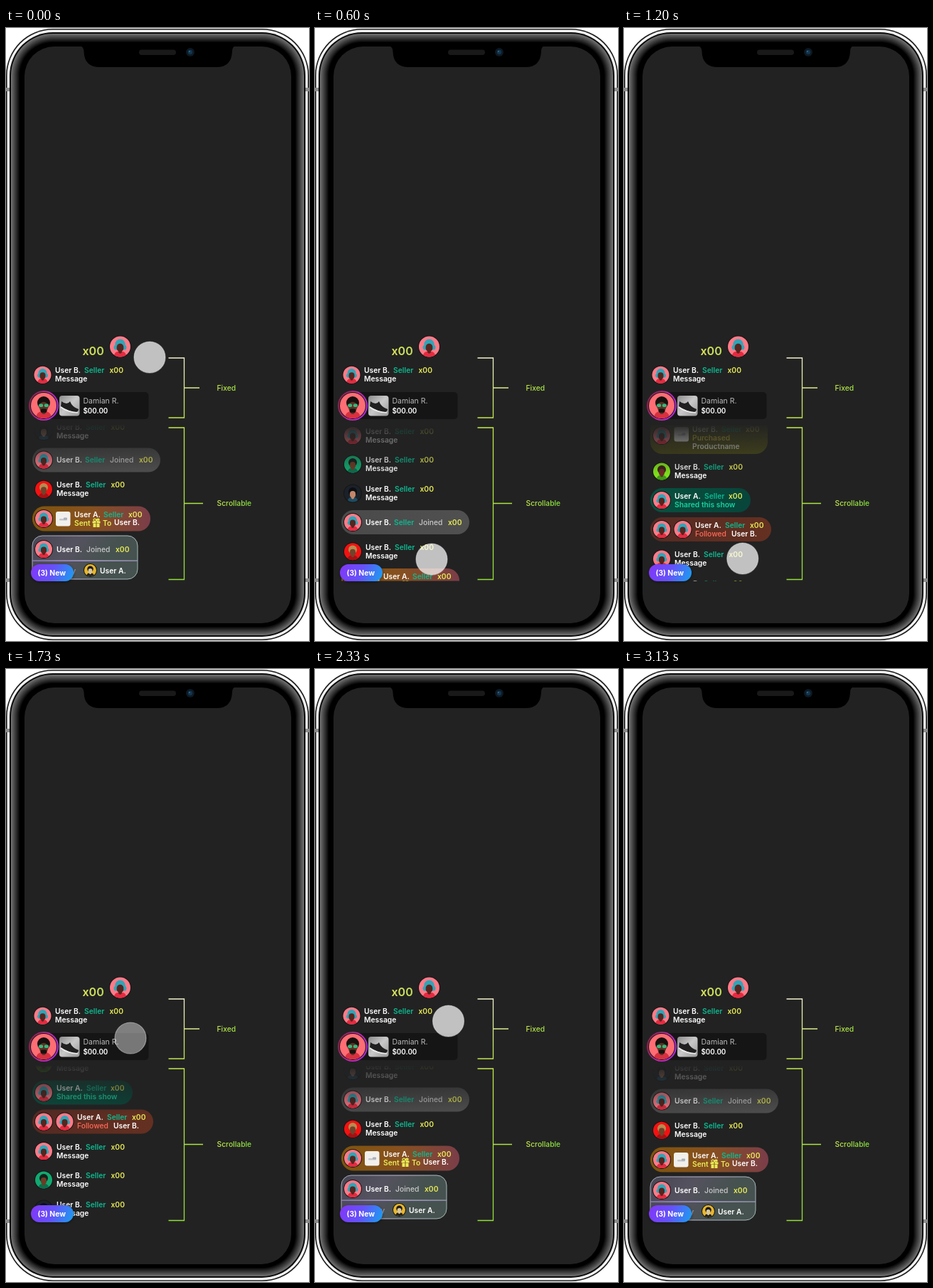
Write an HTML page with a canvas that moves like this. It is 426 by 862 pixels and loops after 3.27 s.

```html
<!DOCTYPE html>
<html lang="en">
<head>
<meta charset="utf-8">
<title>Chat feed scroll</title>
<style>
html, body { margin: 0; width: 100%; height: 100%; overflow: hidden; background: #fff; }
canvas { display: block; width: 426px; height: 862px; }
</style>
</head>
<body>
<canvas id="stage"></canvas>
<script>
const W = 426, H = 862, LOOP = 3270, STEP = 200 / 3;
const canvas = document.getElementById('stage');
const g = canvas.getContext('2d');
const dpr = window.devicePixelRatio || 1;
canvas.width = W * dpr;
canvas.height = H * dpr;

const WHITE = '#fff', GREY = '#c9c9c9', TEAL = '#0db890', YELLOW = '#e9ec55', BG = '#222';

const PEOPLE = {
  pink: { bg: '#ff7b88', shirt: '#e62a40', hair: '#2fa5b8', face: '#54261f' },
  red: { bg: '#f21212', shirt: '#a80f12', hair: '#b98a4e', face: '#70432b' },
  green: { bg: '#12a971', shirt: '#0c6d4c', hair: '#13211c', face: '#6d3b26' },
  dark: { bg: '#1b2128', shirt: '#1f4b63', hair: '#0b0e13', face: '#c4866a' },
  lime: { bg: '#7fe01c', shirt: '#3f9a16', hair: '#3a2318', face: '#6d2c2a' },
  gold: { bg: '#e7b62e', shirt: '#20201c', hair: '#1c1a18', face: '#d9c79c' },
  host: { bg: '#ff6d74', shirt: '#d8303f', hair: '#17110f', face: '#5b3123', glasses: '#38b87c' }
};

// Monotone cubic through [time, value] points
function curve(pts) {
  const n = pts.length;
  const slope = i => (pts[i + 1][1] - pts[i][1]) / (pts[i + 1][0] - pts[i][0]);
  const tan = pts.map((p, i) => {
    if (!i || i === n - 1) return 0;
    const a = slope(i - 1), b = slope(i);
    return a * b > 0 ? 2 * a * b / (a + b) : 0;
  });
  return t => {
    if (t <= pts[0][0]) return pts[0][1];
    if (t >= pts[n - 1][0]) return pts[n - 1][1];
    let i = 0;
    while (t > pts[i + 1][0]) i++;
    const [t0, a] = pts[i], [t1, b] = pts[i + 1];
    const d = t1 - t0, u = (t - t0) / d, v = 1 - u;
    return v * v * (1 + 2 * u) * a + u * u * (3 - 2 * u) * b
      + d * u * v * (v * tan[i] - u * tan[i + 1]);
  };
}

// The feed follows the pressed pointer, then coasts
const scroll = curve([[420, 0], [470, 5], [530, 35], [600, 87.5], [730, 178], [930, 255.5],
  [1070, 260], [1200, 261], [1600, 260.5], [1670, 234], [1730, 192.5], [1800, 148],
  [1870, 104], [2000, 38], [2130, -2], [2200, -4], [2330, -2], [2600, 0]]);
const touchX = curve([[0, 202], [200, 192], [400, 172], [600, 164], [930, 167.5],
  [1330, 166.5], [1730, 175], [2130, 184], [2330, 187.5], [2670, 187.5], [2800, 222],
  [3000, 345], [3070, 398], [3130, 460]]);
const touchY = curve([[0, 463], [200, 530], [330, 610], [470, 664], [530, 694], [600, 747],
  [930, 746], [1330, 746], [1470, 690], [1600, 588], [1670, 561], [1730, 519], [1800, 475],
  [1870, 471], [2200, 471], [2330, 495], [2670, 496], [2800, 474], [3000, 405], [3070, 383],
  [3130, 360]]);
const touchAlpha = curve([[400, .72], [470, .42], [530, .42], [600, .72], [1600, .72],
  [1670, .42], [1800, .42], [1870, .72]]);

function rr(x, y, w, h, r, fill) {
  g.beginPath();
  g.roundRect(x, y, w, h, r);
  if (fill) {
    g.fillStyle = fill;
    g.fill();
  }
}

function disc(x, y, r, fill) {
  g.beginPath();
  g.arc(x, y, r, 0, 7);
  g.fillStyle = fill;
  g.fill();
}

function grad(x0, y0, x1, y1, ...colors) {
  const q = g.createLinearGradient(x0, y0, x1, y1);
  colors.forEach((c, i) => q.addColorStop(i / (colors.length - 1), c));
  return q;
}

// y is the middle of the capitals
function text(s, x, y, color = WHITE, weight = 600, size = 10.3) {
  g.font = `${weight} ${size}px Inter, "Open Sans", sans-serif`;
  g.fillStyle = color;
  g.fillText(s, x, y + size * .365);
}

function avatar(x, y, r, who) {
  const p = PEOPLE[who];
  disc(x, y, r + 1, '#151515');
  disc(x, y, r, p.bg);
  g.save();
  g.beginPath();
  g.arc(x, y, r, 0, 7);
  g.clip();
  g.translate(x, y);
  g.scale(r / 12, r / 12);
  rr(-7, 5.5, 14, 10, 5, p.shirt);
  disc(0, -2.6, 6, p.hair);
  if (who === 'pink') {
    disc(-4.6, 1, 2.8, p.hair);
    disc(4.6, 1, 2.8, p.hair);
  }
  rr(-2, 3, 4, 5, 2, p.face);
  rr(-4, -3.5, 8, 9.5, 4, p.face);
  if (p.glasses) {
    rr(-4.6, -1.6, 4, 3, 1.2, p.glasses);
    rr(.6, -1.6, 4, 3, 1.2, p.glasses);
    rr(-3, 3, 6, 3.5, 1.7, p.hair);
  }
  g.restore();
}

function product(x, y) {
  rr(x, y, 20.5, 20.5, 3, '#f2f0ec');
  rr(x + 5, y + 10, 11, 2.5, 1, '#c5c8cb');
  rr(x + 11, y + 8.5, 5, 3, 1, '#aab0b6');
}

function gift(x, y) {
  rr(x, y - 2.6, 11, 3, .6, YELLOW);
  rr(x + 1, y + 1.1, 9, 5, .6, YELLOW);
  g.strokeStyle = YELLOW;
  g.lineWidth = 1.2;
  g.beginPath();
  g.ellipse(x + 3.4, y - 4.2, 2, 1.5, .4, 0, 7);
  g.ellipse(x + 7.6, y - 4.2, 2, 1.5, -.4, 0, 7);
  g.stroke();
  g.fillStyle = '#80501f';
  g.fillRect(x + 5, y - 2.6, 1, 8.7);
}

function heading(x, y, name, sellerX, countX) {
  text(name, x, y);
  text('Seller', sellerX, y, TEAL);
  text('x00', countX, y, YELLOW);
}

function message(y, who, x = 71, ax = 53) {
  avatar(ax, y, 12, who);
  heading(x, y - 6, 'User B.', x + 41, x + 76.5);
  text('Message', x, y + 6);
}

function pill(y, w, h, ...colors) {
  rr(37, y - h / 2, w, h, 17, grad(37, 0, 37 + w, 0, ...colors));
  avatar(53, y, 12, 'pink');
}

function joined(y) {
  pill(y, 180, 34, '#4a4a4a', '#505050');
  text('User B.', 71, y);
  text('Seller', 111, y, TEAL);
  text('Joined', 146, y, GREY, 500);
  text('x00', 187, y, YELLOW);
}

function sent(y) {
  pill(y, 166, 35, '#80550c', '#87501f', '#7b3d49');
  product(70, y - 10);
  heading(96, y - 6, 'User A.', 137, 172);
  text('Sent', 96, y + 6, YELLOW);
  gift(121.5, y + 6);
  text('To', 136, y + 6, YELLOW);
  text('User B.', 152, y + 5.5);
}

function shared(y) {
  pill(y, 141, 34, '#07503f', '#08453a');
  heading(71, y - 6, 'User A.', 113, 147);
  text('Shared this show', 71, y + 6, '#18d2a0');
}

function followed(y) {
  pill(y, 170, 34, '#552a22', '#643021');
  avatar(82.5, y, 12, 'pink');
  heading(100, y - 6, 'User A.', 142, 177);
  text('Followed', 100, y + 6, '#ff6a58', 500);
  text('User B.', 151, y + 6);
}

function purchased(y) {
  pill(y, 165, 52, '#474718', '#50501a');
  product(70.5, y - 12);
  heading(96, y - 9, 'User B.', 137, 171);
  text('Purchased', 96, y + 3, '#d8c840');
  text('Productname', 96, y + 15, '#e0e0d4');
}

function group(top) {
  rr(37, top, 148, 61, 14, grad(37, top, 120, top + 61, '#474654', '#55525f', '#46524f'));
  g.strokeStyle = grad(37, top, 185, top + 61, '#a6a9b8', '#c3bbd8', '#9fb8b2');
  g.lineWidth = 1;
  g.stroke();
  g.fillStyle = grad(37, 0, 185, 0, '#9c86d8', '#c6b3ee', '#a79fc4');
  g.fillRect(37, top + 34.5, 148, 1.2);
  avatar(53, top + 19, 12, 'pink');
  text('User B.', 71, top + 19);
  text('Joined', 113, top + 19, GREY, 500);
  text('x00', 154, top + 19, YELLOW);
  text('by', 86, top + 49, '#a0a0a8', 500);
  avatar(118.5, top + 48.5, 8.5, 'gold');
  text('User A.', 132, top + 49);
}

function feed(dy) {
  g.save();
  g.beginPath();
  g.rect(30, 558, 192, 219.5);
  g.clip();
  g.translate(0, dy);
  purchased(312);
  message(362.5, 'lime');
  shared(403);
  followed(444);
  message(485.5, 'pink');
  message(526, 'green');
  message(567, 'dark');
  joined(607.5);
  message(648.7, 'red');
  sent(690);
  group(714);
  g.translate(0, -dy);
  g.fillStyle = grad(0, 556, 0, 628, 'rgba(34,34,34,1)', 'rgba(34,34,34,0)');
  g.fillRect(30, 556, 192, 72);
  g.restore();
}

function phone() {
  g.fillStyle = WHITE;
  g.fillRect(0, 0, W, H);
  const layer = (d, fill) => rr(d, d + 1, W - 2 * d, H - 2 - 2 * d, 66 - d, fill);
  layer(0, '#1b1b1b');
  layer(1.6, '#f3f3f3');
  layer(5, '#0a0a0a');
  // metal rim, fading inwards to the black bezel
  for (let d = 7; d <= 19; d++) {
    const v = Math.round(110 * (19 - d) / 12);
    layer(d, `rgb(${v},${v},${v})`);
  }
  g.fillStyle = '#8c8c8c';
  for (const y of [84, 774]) {
    g.fillRect(0, y, 5, 5);
    g.fillRect(W - 5, y, 5, 5);
  }
  rr(26, 26, 375, 811, 42, BG);

  // notch
  g.beginPath();
  g.moveTo(104, 25);
  g.quadraticCurveTo(109, 26, 109.5, 33);
  g.quadraticCurveTo(110, 55, 132, 55);
  g.lineTo(296, 55);
  g.quadraticCurveTo(317, 55, 318, 33);
  g.quadraticCurveTo(318, 26, 323, 25);
  g.fillStyle = '#000';
  g.fill();
  rr(187, 30.5, 52, 7.5, 3.75, '#191919');
  disc(259, 34, 6, '#0e1822');
  disc(259, 34, 3.2, '#12344c');
  disc(258, 33, 1.1, '#2c6a8c');
}

function bracket(top, bottom, mid, end, label, c0, c1) {
  g.strokeStyle = grad(0, top, 0, bottom, c0, c1);
  g.lineWidth = 1.3;
  g.beginPath();
  g.moveTo(228.5, top);
  g.lineTo(250.5, top);
  g.lineTo(250.5, bottom);
  g.lineTo(228.5, bottom);
  g.moveTo(250.5, mid);
  g.lineTo(end, mid);
  g.stroke();
  text(label, 296.5, mid, grad(296, 0, 346, 0, '#c3e64a', '#7fe03a'), 500);
}

function pinned() {
  text('x00', 107.5, 454, grad(107, 0, 138, 0, '#dfe55c', '#bfdc58'), 600, 16);
  avatar(160.5, 448, 14.5, 'pink');
  message(487.7, 'pink', 69, 51.5);

  rr(40, 512, 160.5, 38, 5, '#151515');
  disc(53, 531, 21, grad(34, 524, 74, 538, '#8a2450', '#c02aa0', '#b428ea'));
  avatar(53, 531, 18, 'host');

  g.save();
  rr(75, 517, 28.5, 28.5, 4, grad(75, 517, 103, 545, '#8b8b8b', '#c9c9c9', '#9a9a9a'));
  g.clip();
  g.beginPath();
  g.moveTo(78, 525);
  g.quadraticCurveTo(86, 531, 90, 525);
  g.quadraticCurveTo(93, 533, 102, 536);
  g.quadraticCurveTo(102, 541, 94, 540);
  g.quadraticCurveTo(82, 536, 77, 532);
  g.closePath();
  g.fillStyle = '#202020';
  g.fill();
  g.strokeStyle = '#ededed';
  g.lineWidth = 1.6;
  g.beginPath();
  g.moveTo(77, 533);
  g.quadraticCurveTo(86, 540, 101, 541);
  g.stroke();
  g.restore();

  text('Damian R.', 108.5, 524.5, '#b9b9b9', 400, 10.5);
  text('$00.00', 108.5, 538.5, WHITE, 600, 9.8);
}

function badge() {
  g.save();
  g.shadowColor = 'rgba(0,0,0,.45)';
  g.shadowBlur = 4;
  g.shadowOffsetY = 1;
  rr(35, 754, 60, 24, 12, grad(38, 754, 93, 776, '#8038f8', '#6552fa', '#1c9cf0'));
  g.restore();
  text('(3) New', 44.5, 766, WHITE, 700);
}

function touch(t) {
  disc(touchX(t), touchY(t), 22, `rgba(255,255,255,${touchAlpha(t)})`);
  g.strokeStyle = 'rgba(255,255,255,.42)';
  g.lineWidth = 1.2;
  g.stroke();
}

function draw(t) {
  g.setTransform(dpr, 0, 0, dpr, 0, 0);
  phone();
  feed(scroll(t));
  pinned();
  bracket(464, 548, 506, 272, 'Fixed', '#f4f3cf', '#bfe64c');
  bracket(562, 775.5, 668.5, 277, 'Scrollable', '#c3ea4c', '#93e038');
  badge();
  touch(t);
}

// The prototype runs at 15 pictures a second
function tick(now) {
  const k = Math.floor((now % LOOP + 4) / STEP);
  draw(Math.round(k * STEP / 10) * 10);
  requestAnimationFrame(tick);
}
tick(0);
</script>
</body>
</html>
```
